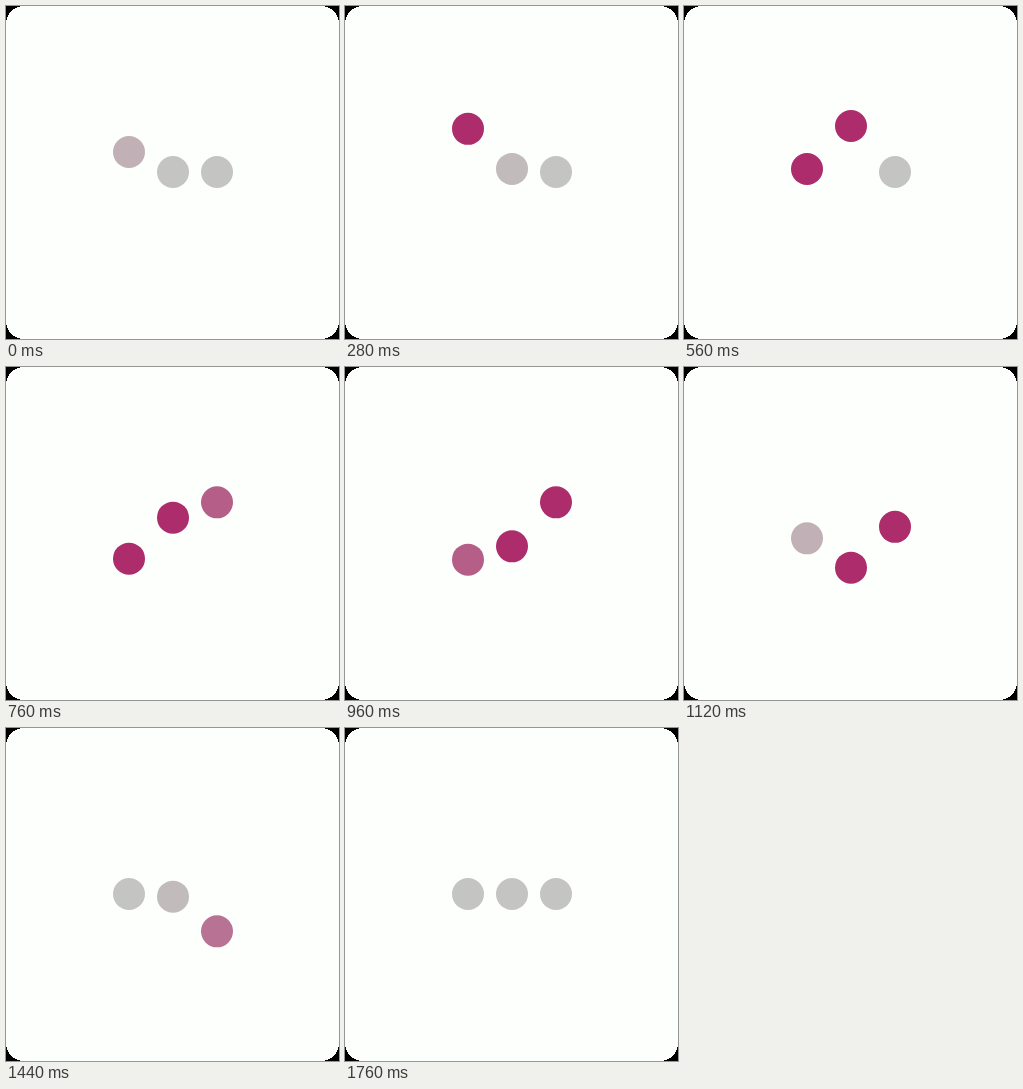
An HTML page that plays this animation: 333 px wide and 333 px high, repeating every 1800 ms.

```html
<!DOCTYPE html>
<html lang="en">
<head>
<meta charset="utf-8">
<title>Bouncing dots</title>
<style>
  html, body { margin: 0; width: 100%; height: 100%; overflow: hidden; background: #000; }
  svg { display: block; width: 100vw; height: 100vh; }
</style>
</head>
<body>
<svg viewBox="0 0 333 333">
  <rect width="333" height="333" rx="18" fill="#fdfffc" shape-rendering="crispEdges"/>
  <circle cx="123" r="16"/>
  <circle cx="167" r="16"/>
  <circle cx="211" r="16"/>
</svg>
<script>
  const LOOP = 1800, STEP = 40, BEAT = 300, LEAD = 40;
  const REST_Y = 166, RISE = 46, DROP = 40;
  const GREY = [196, 197, 194], PINK = [173, 44, 107];

  // Times are in beats: cross is the way down through rest, fade the length of the fade-out.
  const dots = [
    { from: -16, cross: 2.07, fade: 1 },
    { from: 0, cross: 2, fade: 1 },
    { from: 0, cross: 2, fade: 2 }
  ];
  const circles = document.querySelectorAll("circle");

  const clamp = x => Math.min(1, Math.max(0, x));
  const mix = (a, b, k) => a + (b - a) * k;

  // Up to the peak, down through rest to the trough, then back to rest.
  function offset({ from, cross }, beat) {
    if (beat < 1) return mix(from, -RISE, clamp(beat));
    if (beat < cross) return mix(-RISE, 0, (beat - 1) / (cross - 1));
    if (beat < 3) return mix(0, DROP, (beat - cross) / (3 - cross));
    return mix(DROP, 0, clamp(beat - 3));
  }

  function draw(t) {
    dots.forEach((dot, i) => {
      const beat = (t + LEAD) / BEAT - i;
      const tint = Math.min(clamp(beat), clamp((4 - beat) / dot.fade));
      const rgb = GREY.map((c, j) => Math.round(mix(c, PINK[j], tint)));
      circles[i].setAttribute("cy", REST_Y + offset(dot, beat));
      circles[i].setAttribute("fill", `rgb(${rgb})`);
    });
  }

  const start = performance.now();
  function tick() {
    const t = (performance.now() - start) % LOOP;
    draw(Math.floor(t / STEP) * STEP);
    requestAnimationFrame(tick);
  }
  tick();
</script>
</body>
</html>
```
